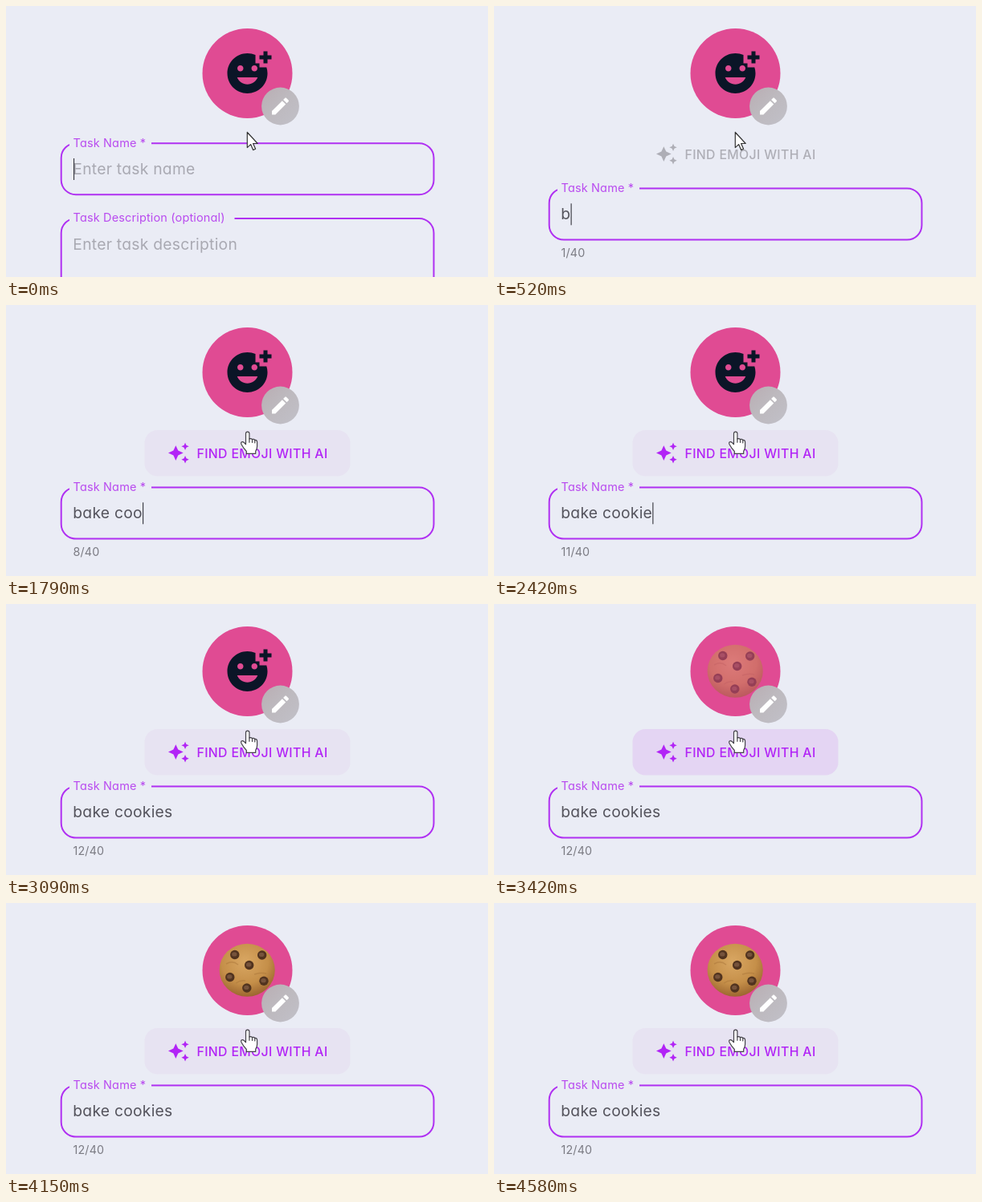
An HTML page that plays this animation: 600 by 338 pixels, repeating every 4.61 s.

```html
<!DOCTYPE html>
<html lang="en">
<head>
<meta charset="utf-8">
<title>Task form</title>
<style>
  html, body { margin: 0; width: 100%; height: 100%; overflow: hidden; background: #eaecf5; }
  svg { display: block; width: 600px; height: 338px; }
  text { font-family: Inter, "Open Sans", sans-serif; font-feature-settings: "cv11"; white-space: pre; }
  .input { font-size: 19.3px; letter-spacing: .25px; fill: #54535c; }
  .hint { fill: #a9a9b2; }
  .label { font-size: 14.5px; letter-spacing: .15px; fill: #b94bef; }
  .count { font-size: 14.3px; letter-spacing: .15px; fill: #7b7b83; }
  .action { font-size: 15.8px; font-weight: 500; letter-spacing: .35px; }
  .outline { fill: none; stroke: #b030f2; stroke-width: 2; }
  .gap { fill: #eaecf5; }
</style>
</head>
<body>
<svg viewBox="0 0 600 338">
  <defs>
    <linearGradient id="glass" x1="0" y1="0" x2="1" y2="1">
      <stop offset="0" stop-color="#b9adb3"/>
      <stop offset=".45" stop-color="#bdb9be"/>
      <stop offset="1" stop-color="#c1c0c8"/>
    </linearGradient>
    <radialGradient id="dough" cx=".46" cy=".34" r=".7">
      <stop offset="0" stop-color="#d9a763"/>
      <stop offset=".6" stop-color="#c58f49"/>
      <stop offset="1" stop-color="#96602c"/>
    </radialGradient>
    <clipPath id="pill"><rect x="172.5" y="156" width="256" height="57.5" rx="16"/></clipPath>
    <g id="chip">
      <circle r="5.7" fill="#51331f"/>
      <ellipse cx="-.5" cy="-.6" rx="3.2" ry="2.6" fill="#76533c"/>
    </g>
  </defs>

  <circle cx="300.5" cy="84" r="56" fill="#e04b93"/>
  <path id="smiley" fill="#0b1527" transform="translate(270.5 54) scale(2.5)" d="M18 9V7h-2V2.84C14.77 2.3 13.42 2 11.99 2 6.47 2 2 6.48 2 12s4.47 10 9.99 10C17.52 22 22 17.52 22 12c0-1.05-.17-2.05-.47-3H18zm-2.5-1c.83 0 1.5.67 1.5 1.5s-.67 1.5-1.5 1.5-1.5-.67-1.5-1.5.67-1.5 1.5-1.5zm-7 0c.83 0 1.5.67 1.5 1.5S9.33 11 8.5 11 7 10.33 7 9.5 7.67 8 8.5 8zm3.5 9.5c-2.33 0-4.32-1.45-5.12-3.5h10.25c-.81 2.05-2.8 3.5-5.13 3.5zM22 3h2v2h-2v2h-2V5h-2V3h2V1h2v2z"/>
  <g id="cookie">
    <ellipse cx="300.2" cy="83.7" rx="34.6" ry="33" fill="url(#dough)"/>
    <path d="M274 76q8-5 15 1M309 89q8-3 15-1M286 100q6-4 12-3" fill="none" stroke="#a9763a" stroke-width="1.5" opacity=".5"/>
    <use href="#chip" x="284.8" y="64.5"/>
    <use href="#chip" x="318.7" y="65"/>
    <use href="#chip" x="302.7" y="77.5"/>
    <use href="#chip" x="278.8" y="92.5"/>
    <use href="#chip" x="321" y="97.3"/>
    <use href="#chip" x="299.8" y="106"/>
  </g>
  <circle cx="341.5" cy="125" r="23.4" fill="url(#glass)"/>
  <path fill="#fff" transform="translate(327.5 111) scale(1.165)" d="M3 17.25V21h3.75L17.81 9.94l-3.75-3.75L3 17.25zM20.71 7.04c.39-.39.39-1.02 0-1.41l-2.34-2.34c-.39-.39-1.02-.39-1.41 0l-1.83 1.83 3.75 3.75 1.83-1.83z"/>

  <g id="button">
    <g clip-path="url(#pill)">
      <rect id="hover" x="172" y="156" width="257" height="58" fill="#b048b0"/>
      <circle id="ripple" cx="300.5" cy="171" fill="#b624ff"/>
    </g>
    <path transform="translate(200.8 170.5) scale(1.17)" d="m19 9 1.25-2.75L23 5l-2.75-1.25L19 1l-1.25 2.75L15 5l2.75 1.25L19 9zm-7.5.5L9 4 6.5 9.5 1 12l5.5 2.5L9 20l2.5-5.5L17 12l-5.5-2.5zM19 15l-1.25 2.75L15 19l2.75 1.25L19 23l1.25-2.75L23 19l-2.75-1.25L19 15z"/>
    <text class="action" x="237.5" y="190.5">FIND EMOJI WITH AI</text>
  </g>

  <g id="name">
    <rect class="outline" x="68.7" y="171.2" width="463.8" height="64" rx="18.2"/>
    <rect class="gap" x="79" y="168" width="102" height="7"/>
    <text class="label" x="83.5" y="175.5">Task Name *</text>
    <text id="hint" class="input hint" x="83.3" y="210">Enter task name</text>
    <text id="value" class="input" x="83.3" y="210"></text>
    <rect id="caret" y="190" width="1.1" height="27" fill="#33333b"/>
    <text id="count" class="count" x="83.5" y="256.4"></text>
  </g>

  <g id="details">
    <rect class="outline" x="68.7" y="265" width="463.8" height="120" rx="18.2"/>
    <rect class="gap" x="79" y="262" width="205.5" height="7"/>
    <text class="label" x="83.5" y="269">Task Description (optional)</text>
    <text class="input hint" x="83.3" y="303.5">Enter task description</text>
  </g>

  <path id="arrow" fill="#fff" stroke="#333" stroke-width="1.2" stroke-linejoin="round" d="M300.3 157.5V176.6L304.6 172.6L307.6 179.6L310.6 178.3L307.6 171.5H313.2Z"/>
  <g id="hand" transform="translate(-.7 .3)" stroke="#45434a" stroke-width="1.2" stroke-linejoin="round" stroke-linecap="round">
    <path fill="#fff" d="M299.2 160.2q0-2.4 2.2-2.4t2.2 2.4V166.6q2.2-1 3.6.7q2-.7 3.3.9q2.8-.3 2.8 2.6V176q0 3.6-1.9 6V185H300V182.2q-3.4-3.4-6.3-8.8q-1-2.7 1.1-3.1q1.7-.2 4.4 3.2Z"/>
    <path fill="none" d="M303.6 166.6V171M307.2 167.3V171.2M310.5 168.2V171.6"/>
  </g>
</svg>
<script>
  const LOOP = 4610, WORD = "bake cookies", LIMIT = 40;
  const FIRST_KEY = 450, KEY_GAP = 180, MIN_LENGTH = 5;
  const ENABLE = FIRST_KEY + (MIN_LENGTH - 1) * KEY_GAP;
  const CARET_OFF = FIRST_KEY + (WORD.length - 1) * KEY_GAP + 500;
  const PRESS = 3110, RELEASE = 3430, SWAP = 3280;
  const GREY = [174, 174, 182], PURPLE = [178, 36, 246];

  const $ = id => document.getElementById(id);
  const set = (id, attrs) => {
    for (const key in attrs) $(id).setAttribute(key, attrs[key]);
  };
  const show = (id, on) => set(id, { visibility: on ? "visible" : "hidden" });
  const ramp = (t, start, length) => Math.min(1, Math.max(0, (t - start) / length));
  const ease = p => 1 - (1 - p) ** 3;
  const mix = (a, b, p) => `rgb(${a.map((v, i) => Math.round(v + (b[i] - v) * p))})`;

  function draw(t) {
    const typed = t < FIRST_KEY ? 0
      : Math.min(WORD.length, 1 + Math.floor((t - FIRST_KEY) / KEY_GAP));
    const active = typed >= MIN_LENGTH;
    const glow = ease(ramp(t, ENABLE, 250));

    $("value").textContent = WORD.slice(0, typed);
    $("count").textContent = typed ? `${typed}/${LIMIT}` : "";
    set("name", { transform: `translate(0 ${typed ? 56.3 : 0})` });
    set("caret", { x: 84 + (typed ? $("value").getComputedTextLength() - 0.5 : 0) });
    show("caret", t < CARET_OFF);
    show("hint", !typed);
    show("details", !typed);

    show("button", typed);
    set("button", { fill: mix(GREY, PURPLE, glow) });
    set("hover", { opacity: 0.055 * glow });
    set("ripple", {
      r: 135 * ease(ramp(t, PRESS, 250)),
      opacity: 0.07 * (1 - ramp(t, RELEASE, 220))
    });

    show("arrow", !active);
    show("hand", active);
    show("smiley", t < SWAP);
    set("cookie", { opacity: ramp(t, SWAP, 270) });
  }

  const origin = performance.now();
  function tick() {
    draw((performance.now() - origin) % LOOP);
    requestAnimationFrame(tick);
  }
  draw(0);
  requestAnimationFrame(tick);
</script>
</body>
</html>
```
